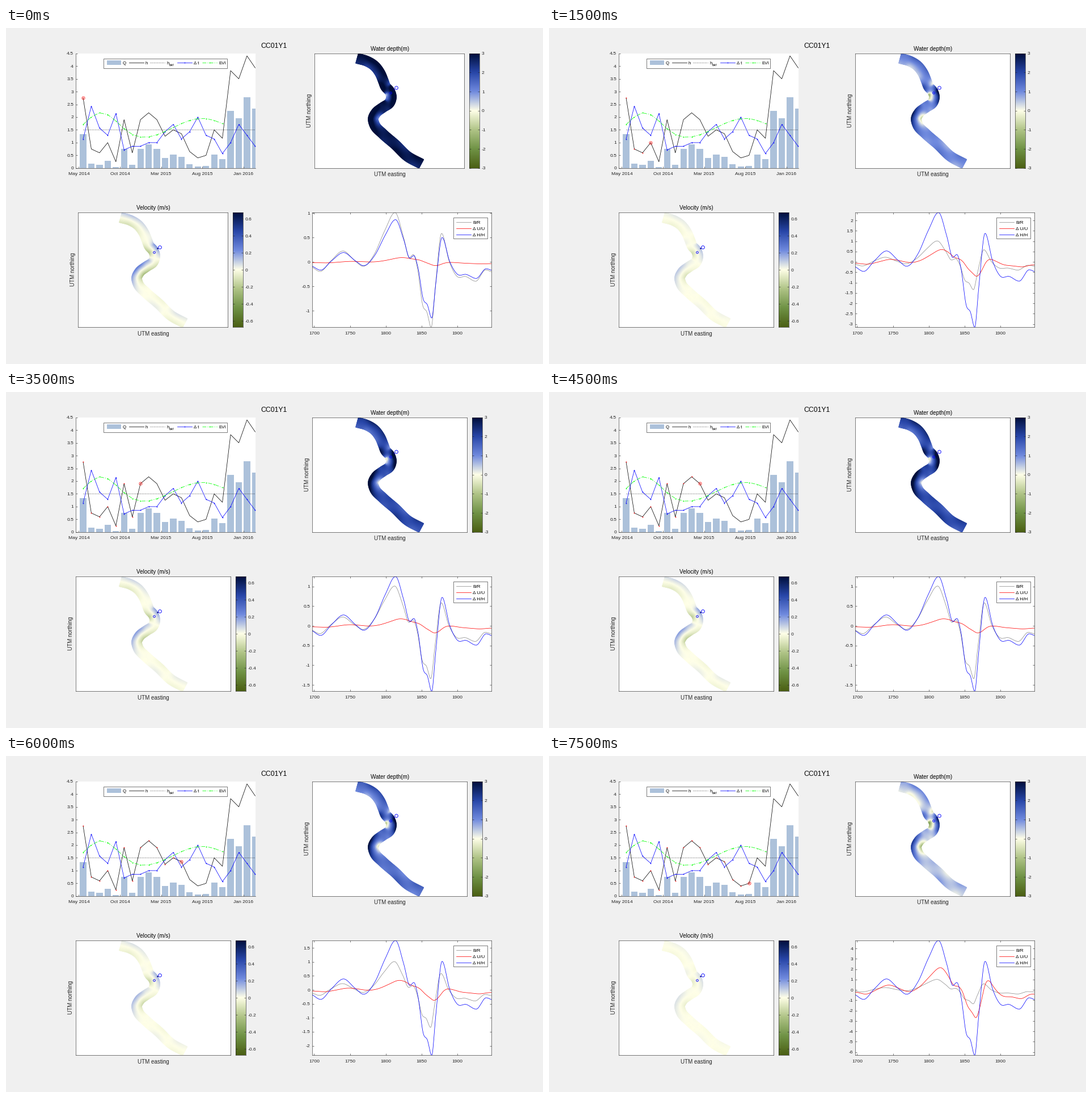
Animation of 947 by 592 pixels, one loop 8000 ms. Source, as a matplotlib script:

```python
import numpy as np
import matplotlib.pyplot as plt
from matplotlib.animation import FuncAnimation
from matplotlib.colors import LinearSegmentedColormap
from matplotlib.patches import Rectangle

W, H, DPI = 947, 592, 64
PX = 72 / DPI  # points per pixel
INK = "#262626"
BLUE, RED, GREEN, GRAY, BAR = "#0000ff", "#ff0000", "#00ff00", "#8c8c8c", "#acc1da"
THIN = 0.75 * PX
TOP, BOTTOM = 44.6, 246.9  # upper row of panels
ROW = 280.5  # distance to the lower row

plt.rcParams.update({
    "font.family": "Liberation Sans",
    "axes.unicode_minus": False,
    "axes.linewidth": 0.6 * PX,
    "axes.edgecolor": INK,
    "xtick.color": INK,
    "ytick.color": INK,
})

# Monthly series: stage and time lag are observed, the rest follows from rules
STAGE = np.array([2.75, .75, .6, 1, .25, 1.9, .6, 1.9, 2.17, 1.9, 1.25, 1.5,
                  1.35, .65, .4, .5, 1.5, 1.17, 3.82, 3.5, 4.4, 3.93])
DELTA_T = np.array([8, 17, 11, 9, 15, 5, 6, 6, 7, 7, 10, 12,
                    8, 10, 14, 9, 8, 4, 7, 12, 9, 6]) / 7
months = np.arange(len(STAGE))
FLOW = .28 * STAGE ** 1.55  # rating curve
EVI = (1.02 + 1.15 * np.exp(-((months - 2.2) / 3.07) ** 2)
       + .93 * np.exp(-((months - 14.5) / 5) ** 2))[:18]
STEPS = 16

# Depth contrast across the channel: key distances and values
DEPTH_KEYS = np.array([
    (1697.6, -.24), (1709, -.46), (1724, .05), (1741, .53), (1757, .08),
    (1769, -.21), (1785, .4), (1799, 1.5), (1813.5, 2.385), (1825, 1.25),
    (1833.5, .21), (1839, .36), (1845, -.34), (1852, -2.07), (1858, -2.42),
    (1864, -3.16), (1869.5, -1.3), (1878.5, 1.38), (1889, .04), (1899.5, -.68),
    (1912, -.7), (1926, -.93), (1940, -.38), (1947.6, -.47)])

# River centreline, upstream from the lower right
CENTRE = np.array([
    (732, 239), (708, 226), (686, 205), (664, 186), (650, 171), (647, 160),
    (652, 149), (664, 139.5), (676, 131), (679, 121), (676, 111), (669, 103),
    (665, 93), (659, 79), (649, 66), (636, 58), (618.5, 53)])
HALF_WIDTH = 8.9

TONES = [(75, 95, 20), (112, 147, 70), (176, 196, 135), (255, 255, 232),
         (112, 138, 222), (40, 70, 168), (0, 14, 58)]
CMAP = LinearSegmentedColormap.from_list("river", np.array(TONES) / 255, 512)


def smooth(x, y, q):
    """Cubic Hermite curve through the rows of y, level at its extremes."""
    m = np.gradient(y, x, axis=0)
    rise = np.diff(y, axis=0)
    m[1:-1][rise[:-1] * rise[1:] <= 0] = 0
    i = np.clip(np.searchsorted(x, q) - 1, 0, len(x) - 2)
    step = (x[i + 1] - x[i])[:, None]
    t = (q - x[i])[:, None] / step
    return ((1 + 2 * t) * (1 - t) ** 2 * y[i] + t * (1 - t) ** 2 * step * m[i]
            + t * t * (3 - 2 * t) * y[i + 1] + t * t * (t - 1) * step * m[i + 1])


S = np.linspace(1697.6, 1947.6, 500)
DEPTH = smooth(DEPTH_KEYS[:, 0], DEPTH_KEYS[:, 1:], S)[:, 0]


def bend_ratio(h):
    """The bends lead the depth response, more so in shallow water."""
    lead = .7 + .6 * (2.75 - h)
    return .425 * np.interp(S + lead, S, DEPTH)


def speed_contrast(h):
    """Depth contrast relaxed along the flow; deep water adapts slowly."""
    gain = 1 - np.exp(-(S[1] - S[0]) / (8 * h))
    out = DEPTH.copy()
    for i in range(1, len(S)):
        out[i] = out[i - 1] + gain * (DEPTH[i] - out[i - 1])
    return (.22 + .065 * h) * out


def box(x0, y0, x1, y1):
    return [x0 / W, 1 - y1 / H, (x1 - x0) / W, (y1 - y0) / H]


fig = plt.figure(figsize=(W / DPI, H / DPI), dpi=DPI, facecolor="#f0f0f0")


def label(x, y, text, size=9.85, color=INK, ha="center", **kw):
    return fig.text(x / W, 1 - y / H, text, fontsize=size * PX, color=color,
                    ha=ha, **kw)


def style_ticks(ax, **kw):
    ax.tick_params(direction="in", length=2.6 * PX, width=0.6 * PX,
                   labelsize=8.45 * PX, pad=4 * PX, **kw)
    ax.tick_params(axis="x", pad=7.3 * PX)


label(473, 35, "CC01Y1", 12.3, "black")

# Time series
ts = fig.add_axes(box(123, TOP, 440, BOTTOM))
ts.set(xlim=(-.9, 21.04), ylim=(0, 4.5))
ts.spines[["top", "right"]].set_visible(False)
style_ticks(ts)
ts.set_xticks(-.52 + 5.02 * np.arange(5),
              ["May 2014", "Oct 2014", "Mar 2015", "Aug 2015", "Jan 2016"])
levels = np.arange(10) / 2
ts.set_yticks(levels, [f"{v:g}" for v in levels])
DOT = dict(marker="o", ms=1.8 * PX, mew=0)
DOTTED, DASHDOT = (0, (1.2, 2.2)), (0, (9, 3, 1.5, 3))
ts.bar(months, FLOW, .78, color=BAR)
ts.plot(months, STAGE, color="black", lw=THIN)
ts.plot([0, 22], [1.5, 1.5], color="black", lw=THIN, ls=DOTTED)
ts.plot(months, DELTA_T, color=BLUE, lw=THIN, **DOT)
ts.plot(months[:len(EVI)], EVI, color=GREEN, lw=THIN, ls=DASHDOT, **DOT)
seen, = ts.plot([], [], color=RED, ls="none", **DOT)
now, = ts.plot([], [], color=RED, ls="none", marker="o", ms=5.2 * PX,
               mfc="none", mew=0.7 * PX)

# River mesh
chord = np.r_[0, np.cumsum(np.hypot(*np.diff(CENTRE, axis=0).T))]
along = np.linspace(0, chord[-1], 260)
mid = smooth(chord, CENTRE, along)
tangent = np.gradient(mid, along, axis=0)
tangent /= np.hypot(*tangent.T)[:, None]
across = np.linspace(-1, 1, 15)[:, None]
MESH_X = mid[:, 0] + HALF_WIDTH * across * tangent[:, 1]
MESH_Y = mid[:, 1] - HALF_WIDTH * across * tangent[:, 0]
RIVER_S = S[0] + (S[-1] - S[0]) * along / chord[-1]


def spread(curve):
    """Tilt a contrast curve across the channel."""
    return np.interp(RIVER_S, S, curve) * across


class RiverMap:
    def __init__(self, dx, dy, title, limit, ticks):
        self.dx, self.dy = dx, dy
        self.ax = fig.add_axes(self.place(540, 813.4))
        self.ax.set(xticks=[], yticks=[], ylim=(BOTTOM - .5, TOP - .5))
        self.mesh = self.ax.pcolormesh(
            MESH_X, MESH_Y, 0 * MESH_X, shading="gouraud", cmap=CMAP,
            vmin=-limit, vmax=limit)
        for x, y, size in ((687.3, 105, 5.6), (677, 113.6, 3.6)):
            self.ax.plot(x, y, "o", ms=size * PX, mfc="none", mec=BLUE,
                         mew=0.9 * PX)
        self.ax.plot(683, 107.3, "o", ms=2.4 * PX, color="#000080", mew=0)
        self.bar = fig.add_axes(self.place(822, 840))
        self.bar.imshow(np.linspace(-1, 1, 256)[:, None], cmap=CMAP,
                        origin="lower", aspect="auto",
                        extent=(0, 1, -limit, limit))
        self.bar.yaxis.tick_right()
        self.bar.set_xticks([])
        self.bar.set_yticks(ticks, [f"{t:g}" for t in ticks])
        style_ticks(self.bar, left=True)
        label(676.7 + dx, 39.5 + dy, title, color="black")
        label(676.5 + dx, 261 + dy, "UTM easting")
        self.north = label(531 + dx, 145 + dy, "UTM northing", rotation=90,
                           va="center")

    def place(self, x0, x1):
        return box(x0 + self.dx, TOP + self.dy, x1 + self.dx, BOTTOM + self.dy)

    def show(self, field, narrow):
        x0, x1 = 540 + 4 * narrow, 813.4 - 5 * narrow
        self.ax.set_position(self.place(x0, x1))
        self.ax.set_xlim(x0 - .5, x1 - .5)
        left = 822 - 5 * narrow
        self.bar.set_position(self.place(left, left + 18))
        self.north.set_x((531 + 4 * narrow + self.dx) / W)
        self.mesh.set_array(field)


depth_map = RiverMap(0, 0, "Water depth(m)", 3, range(-3, 4))
speed_map = RiverMap(-417, ROW, "Velocity (m/s)", .675, np.arange(-3, 4) / 5)

# Contrast curves
cv = fig.add_axes(box(540.4, TOP + ROW, 856.4, BOTTOM + ROW))
cv.set_xlim(S[0], S[-1])
cv.set_xticks(range(1700, 1901, 50))
style_ticks(cv, top=True, right=True)
lines = [cv.plot(S, 0 * S, color=c, lw=THIN)[0] for c in (GRAY, RED, BLUE)]

# Legends, drawn in stage pixels
ov = fig.add_axes([0, 0, 1, 1], facecolor="none")
ov.set(xlim=(0, W), ylim=(H - .6, -.6))
ov.axis("off")


def frame(x0, y0, x1, y1):
    ov.add_patch(Rectangle((x0, y0), x1 - x0, y1 - y0, fc="white", ec=INK,
                           lw=0.6 * PX))


def key(x, y, color, text, size, **kw):
    ov.plot([x, x + 26], [y, y], color=color, lw=THIN, **kw)
    ov.text(x + 29, y + 3, text, fontsize=size * PX, color="black")


frame(172, 53, 390, 70)
ov.add_patch(Rectangle((178, 56), 25.5, 8, fc=BAR, ec="none"))
ov.text(206, 63, "Q", fontsize=7.9 * PX)
key(217, 60, "black", "h", 7.9)
key(254.5, 60, "black", "h", 7.9, ls=DOTTED)
ov.text(288, 66, "bkf", fontsize=6.3 * PX)
key(302, 60, BLUE, "\u0394 t", 7.9)
ov.plot(315, 60, color=BLUE, **DOT)
key(346, 60, GREEN, "EVI", 7.9, ls=DASHDOT)
ov.plot(359, 60, color=GREEN, **DOT)

frame(789, 333, 849, 370)
key(794.5, 341, GRAY, "B/R", 8.3)
key(794.5, 352, RED, "\u0394 U/U", 8.3)
key(794.5, 363, BLUE, "\u0394 H/H", 8.3)


def nice_ticks(lo, hi):
    for step in (.1, .2, .5, 1, 2, 5, 10):
        first, last = int(np.ceil(lo / step)), int(np.floor(hi / step))
        if last - first <= 10:
            break
    return np.arange(first, last + 1) * step


def update(k):
    h = STAGE[k]
    seen.set_data(months[:k + 1], STAGE[:k + 1])
    now.set_data([k], [h])

    speed = speed_contrast(h)
    depth_map.show(h + .75 * spread(DEPTH), k == 0)
    speed_map.show(.18 * h ** .85 * spread(speed), k == 0)

    data = bend_ratio(h), speed * h ** -1.9, DEPTH / h
    for line, y in zip(lines, data):
        line.set_ydata(y)
    lo, hi = np.min(data), np.max(data)
    ticks = nice_ticks(lo, hi)
    cv.set_yticks(ticks, [f"{t:g}" for t in ticks])
    cv.set_ylim(lo, hi)
    return []


anim = FuncAnimation(fig, update, frames=STEPS, interval=500, repeat=True,
                     repeat_delay=0, init_func=lambda: update(0))
plt.show()
```
